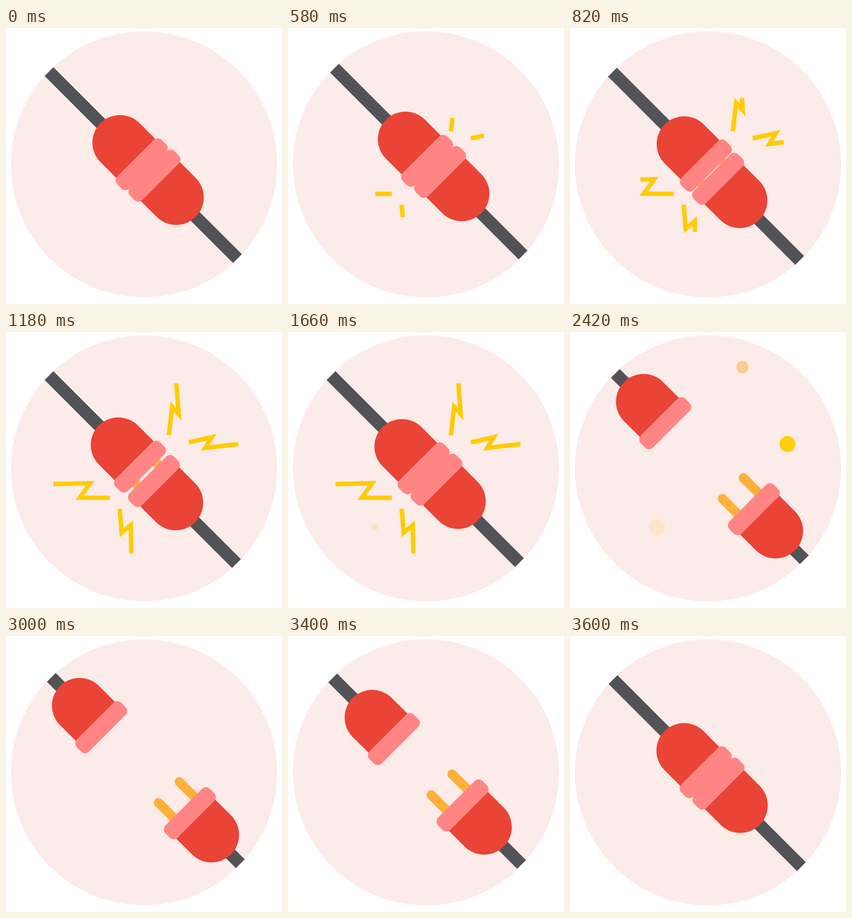
An HTML page that plays this animation: 500x500 px, repeating every 3.62 s.

```html
<!DOCTYPE html>
<html lang="en">
<head>
<meta charset="utf-8">
<title>Plug and socket</title>
<style>
  html, body { margin: 0; width: 100%; height: 100%; overflow: hidden; background: #fff; }
  svg { display: block; width: 100%; height: 100%; }
  .body { fill: #e94435; }
  .band { fill: #ff8584; }
  .cable { stroke: #525357; stroke-width: 22.6; }
  .prong { stroke: #ffb03b; stroke-width: 17; stroke-linecap: round; }
  .bolt { fill: none; stroke: #fc0; stroke-width: 8; stroke-miterlimit: 10; }
</style>
</head>
<body>
<svg viewBox="0 0 500 500">
  <circle cx="250" cy="247" r="241" fill="#fbebe9"/>
  <g id="plug">
    <line class="cable" x1="90"/>
    <path class="prong" d="M-53.5-26.7H-8M-53.5 26.7H-8"/>
    <path class="body" d="M15-50H55.5A50 50 0 0 1 55.5 50H15Z"/>
    <rect class="band" x="-15.6" y="-57" width="31.2" height="114" rx="10"/>
  </g>
  <g id="socket">
    <line class="cable" x1="-90"/>
    <path class="body" d="M-15-50H-55.5A50 50 0 0 0-55.5 50H-15Z"/>
    <rect class="band" x="-15.6" y="-57" width="31.2" height="114" rx="10"/>
  </g>
  <g id="sparks"></g>
</svg>
<script>
const LOOP = 3620;
const sparks = document.getElementById('sparks');

// open = band centre when apart, shut = shift to the joined place,
// edge = x + y of the diagonal where the cable is cut off
const socket = { el: document.getElementById('socket'), open: [172.5, 165.3], shut: [73.3, 81.6], edge: 157 };
const plug = { el: document.getElementById('plug'), open: [333, 321], shut: [-64, -53.5], edge: 837 };

// time, socket x, y, plug x, y
const shake = [
  [320, 0, 0, 0, 0],
  [420, 7, -8, 7, -7],
  [520, -3, 3, -4, 4],
  [620, 11, -11, 12, -12],
  [720, -4, 4, -6, 6],
  [820, 0.4, 2.4, -0.7, 5.7],
  [900, 6, -7, 8, -7],
  [980, -1, 3, -7, 7],
  [1080, 15, -15, 19, -19],
  [1180, -3, -3, -1, 2.5],
  [1280, 8, -8, 8, -8],
  [1360, -2, 2, -2, 3],
  [1420, 0, 0, 0, 0]
];

const bolts = [
  'M295 187L301 135.6L313 148.8L308.5 93',
  'M331 200L373 190.5L361 210L421 203',
  'M188 300.5L133.7 300L152.6 274L86 275.5',
  'M206 320L209.5 363.7L226.1 349.7L227 401'
].map(d => add('path', { class: 'bolt', d, pathLength: 1 }));

const dots = [
  { x: 157.5, y: 354, fill: '#fc0', from: 1580, peak: 1975, to: 2490 },
  { x: 394, y: 203, fill: '#fc0', from: 1990, peak: 2390, to: 2890 },
  { x: 312.5, y: 63.5, fill: '#ffb03b', from: 2210, peak: 2620, to: 3000 }
];
for (const d of dots) d.el = add('circle', { cx: d.x, cy: d.y, fill: d.fill });

function add(tag, attrs) {
  const el = document.createElementNS('http://www.w3.org/2000/svg', tag);
  set(el, attrs);
  return sparks.appendChild(el);
}

function set(el, attrs) {
  for (const k in attrs) el.setAttribute(k, attrs[k]);
}

function part(t, a, b) {
  return Math.min(1, Math.max(0, (t - a) / (b - a)));
}

function ease(t, a, b) {
  const p = part(t, a, b);
  return p * p * (3 - 2 * p);
}

function shakeAt(t) {
  const i = shake.findIndex(k => k[0] > t);
  if (i < 1) return [0, 0, 0, 0];
  const a = shake[i - 1], b = shake[i];
  const p = ease(t, a[0], b[0]);
  return [1, 2, 3, 4].map(n => a[n] + (b[n] - a[n]) * p);
}

function place(item, joined, dx, dy) {
  const x = item.open[0] + item.shut[0] * joined + dx;
  const y = item.open[1] + item.shut[1] * joined + dy;
  set(item.el, { transform: `translate(${x} ${y}) rotate(45)` });
  set(item.el.querySelector('.cable'), { x2: (item.edge - x - y) / Math.SQRT2 });
}

function draw(t) {
  const joined = 1 - ease(t, 2100, 2400) + ease(t, 3300, 3600);
  const [sx, sy, px, py] = shakeAt(t);
  place(socket, joined, sx, sy);
  place(plug, joined, px, py);

  const start = ease(t, 1770, 2380), end = ease(t, 400, 1040);
  for (const b of bolts) {
    set(b, {
      visibility: end - start > 0.001 ? 'visible' : 'hidden',
      'stroke-dasharray': `0 ${start} ${end - start} 2`
    });
  }

  for (const d of dots) {
    const grow = part(t, d.from, d.peak);
    set(d.el, {
      r: 14.5 * grow * (2 - grow),
      opacity: grow * (1 - part(t, d.peak, d.to))
    });
  }
}

const begin = performance.now();
function tick() {
  draw((performance.now() - begin) % LOOP);
  requestAnimationFrame(tick);
}
tick();
</script>
</body>
</html>
```
